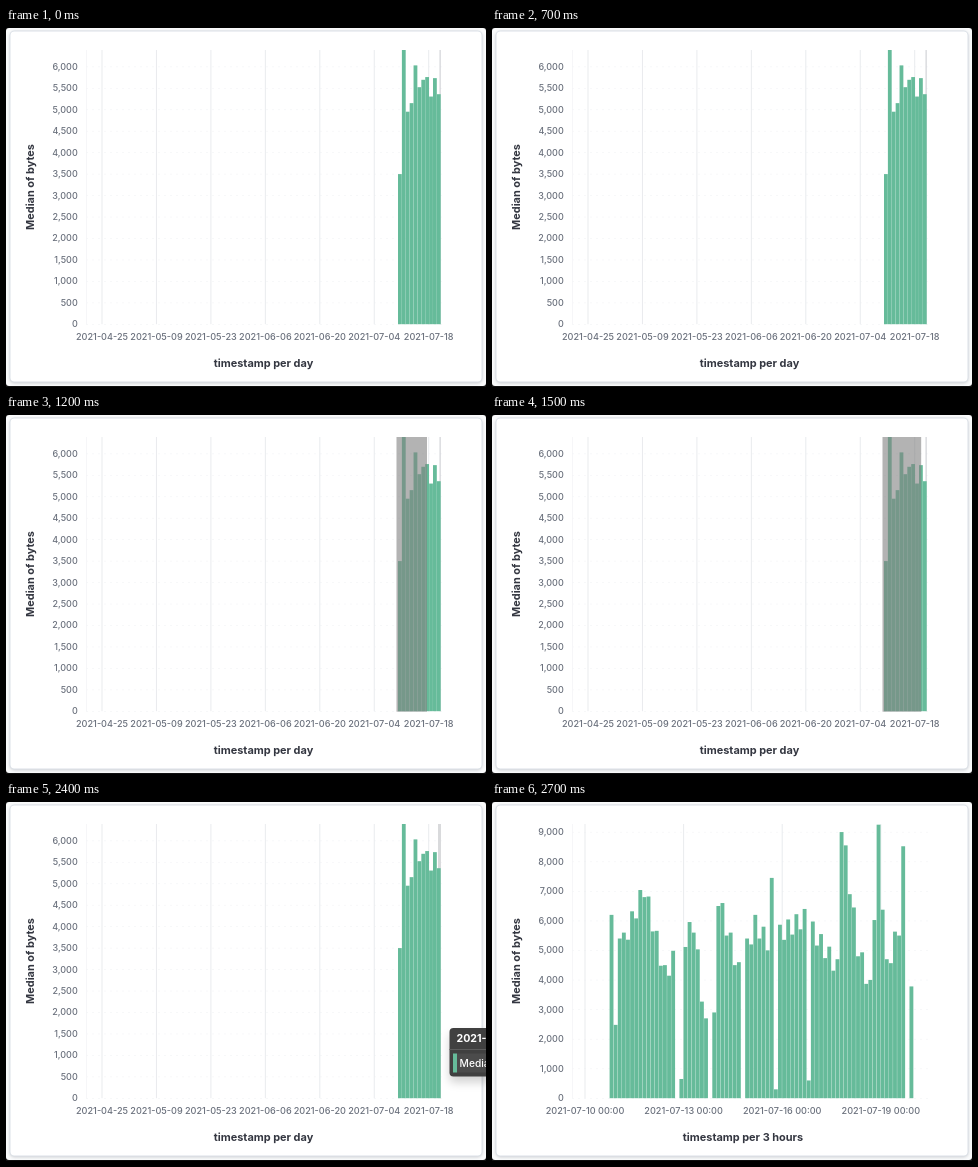
Animation, 480 px wide and 359 px high, one loop 4100 ms. Source, as an HTML page with a canvas:

```html
<!DOCTYPE html>
<html lang="en">
<head>
<meta charset="utf-8">
<title>Brush to zoom</title>
<style>
  html, body { margin: 0; width: 100%; height: 100%; overflow: hidden; background: #fafbfd; }
  canvas { display: block; }
</style>
</head>
<body>
<canvas id="stage" width="480" height="359"></canvas>
<script>
const ctx = document.getElementById('stage').getContext('2d');
const LOOP = 4100, STEP = 100;
const LEFT = 80, RIGHT = 434.6, TOP = 22, BASE = 296.2;
const GREEN = '#66bb9a', GREY = '#6b717d', INK = '#343741';

// Bars follow a line through the trend points [index, value], plus a wobble;
// odd ones out (gaps and spikes) are given by index.
const daily = {
  title: 'timestamp per day', titleX: 257.5,
  unit: 500, unitHeight: 21.46, rows: 12,
  firstDay: Date.UTC(2021, 3, 25), tickDays: 14, tickCount: 7, tickSuffix: '',
  tickX: 96, tickGap: 54.45,
  barX: 392, pitch: 3.89, gap: 0.1,
  trend: [[0, 3750], [1, 6500], [2, 4920], [4, 5770], [10, 5450]],
  wobble: i => 260 * Math.cos(2.416 * (i - 4)),
  odd: {}
};

const hourly = {
  title: 'timestamp per 3 hours', titleX: 251,
  unit: 1000, unitHeight: 29.57, rows: 9,
  firstDay: Date.UTC(2021, 6, 10), tickDays: 3, tickCount: 4, tickSuffix: ' 00:00',
  tickX: 93, tickGap: 98.6,
  barX: 117.6, pitch: 4.108, gap: 0.25,
  trend: [
    [0, 6500], [3, 5300], [8, 7100], [13, 4200], [20, 5900], [23, 2400], [25, 2600], [26, 6800],
    [31, 4300], [35, 5900], [38, 5300], [47, 6100], [55, 4400], [56, 9300], [60, 5100],
    [63, 3700], [65, 8950], [67, 4400], [70, 5800], [73, 10000]
  ],
  wobble: i => i % 2 ? 300 : -300,
  odd: { 1: 2480, 16: 0, 17: 650, 24: 0, 32: 0, 39: 7450, 40: 300, 48: 600, 71: 8520, 72: 0, 73: 3780 }
};

function barValue({ trend, wobble, odd }, i) {
  if (i in odd) return odd[i];
  const k = Math.max(1, trend.findIndex(([x]) => x >= i));
  const [x0, y0] = trend[k - 1], [x1, y1] = trend[k];
  return y0 + (y1 - y0) * (i - x0) / (x1 - x0) + wobble(i);
}

function rect(x, y, w, h, color) {
  ctx.fillStyle = color;
  ctx.fillRect(x, y, w, h);
}

function roundRect(x, y, w, h, r, color) {
  ctx.beginPath();
  ctx.roundRect(x, y, w, h, r);
  ctx.fillStyle = color;
  ctx.fill();
}

function text(str, x, y, size, color, align = 'center', weight = 500) {
  ctx.font = `${weight} ${size}px Inter, sans-serif`;
  ctx.fillStyle = color;
  ctx.textAlign = align;
  ctx.fillText(str, x, y);
}

function shadow(color, blur, y) {
  ctx.shadowColor = color;
  ctx.shadowBlur = blur;
  ctx.shadowOffsetY = y;
}

function drawPanel() {
  rect(0, 0, 480, 359, '#111');
  roundRect(0, 0, 480, 358, 3, '#fafbfc');
  shadow('rgba(90,95,105,.25)', 3, 1);
  roundRect(3.5, 2.5, 473, 352, 5, '#dbe0e7');
  shadow('transparent', 0, 0);
  roundRect(4.5, 3.5, 471, 350, 4, '#fff');
}

function drawAxes(c) {
  rect(LEFT, TOP, 0.7, BASE - TOP, '#f2f3f5');
  for (let i = 0; i <= c.rows; i++) {
    const y = 296 - i * c.unitHeight;
    for (let x = LEFT; x < RIGHT; x += 6) rect(x, y, 2, 0.7, '#f4f5f7');
    text((i * c.unit).toLocaleString('en-US'), 71.7, y + 3.3, 9, GREY, 'right');
  }
  for (let i = 0; i < c.tickCount; i++) {
    const x = c.tickX + i * c.tickGap;
    const day = new Date(c.firstDay + i * c.tickDays * 864e5);
    rect(x - 0.5, TOP, 1, BASE - TOP, '#e9ebee');
    text(day.toISOString().slice(0, 10) + c.tickSuffix, x, 312.3, 9.15, GREY);
  }
  text(c.title, c.titleX, 338.7, 10.93, INK, 'center', 700);
  ctx.save();
  ctx.translate(28, 159);
  ctx.rotate(-Math.PI / 2);
  text('Median of bytes', 0, 0, 10.93, INK, 'center', 700);
  ctx.restore();
}

function drawBars(c) {
  const count = c.trend.at(-1)[0] + 1;
  for (let i = 0; i < count; i++) {
    const h = Math.min(barValue(c, i) / c.unit * c.unitHeight, BASE - TOP);
    rect(c.barX + i * c.pitch, BASE - h, c.pitch - c.gap, h, GREEN);
  }
}

function drawCursor(hovered) {
  if (hovered) rect(432, TOP, 3, BASE - TOP, '#d9dadc');
  else rect(433.6, TOP, 1, BASE - TOP, '#c9cbcf');
}

function drawBrush(t) {
  const p = Math.min(Math.floor((t - 700) / STEP) / 12, 1);
  const eased = (1 - Math.exp(-2.3 * p)) / (1 - Math.exp(-2.3));
  rect(390.5, TOP, 0.5 + 43.8 * eased, BASE - TOP + 0.5, 'rgba(128,128,128,.6)');
}

function drawTooltip(alpha) {
  ctx.save();
  ctx.globalAlpha = alpha;
  shadow('rgba(0,0,0,.18)', 10, 6);
  roundRect(443.5, 226, 140, 48.5, 4, '#404040');
  shadow('transparent', 0, 0);
  rect(443.5, 247, 140, 1, '#5c5c5c');
  rect(447, 251.5, 4, 19, GREEN);
  rect(451, 251.5, 130, 19, '#4b4b4b');
  text('2021-07-21', 450.5, 240.3, 10.6, '#fff', 'left', 700);
  text('Median of bytes', 453.6, 264.6, 10.2, '#fff', 'left');
  ctx.restore();
}

function draw(t) {
  const chart = t < 2700 ? daily : hourly;
  drawPanel();
  drawAxes(chart);
  if (chart === daily) drawCursor(t >= 2400);
  drawBars(chart);
  if (t >= 800 && t < 2400) drawBrush(t);
  if (t >= 2400 && t < 2600) drawTooltip(t < 2500 ? 1 : 0.6);
}

const start = performance.now();
function tick() {
  draw((performance.now() - start) % LOOP);
  requestAnimationFrame(tick);
}
tick();
</script>
</body>
</html>
```
